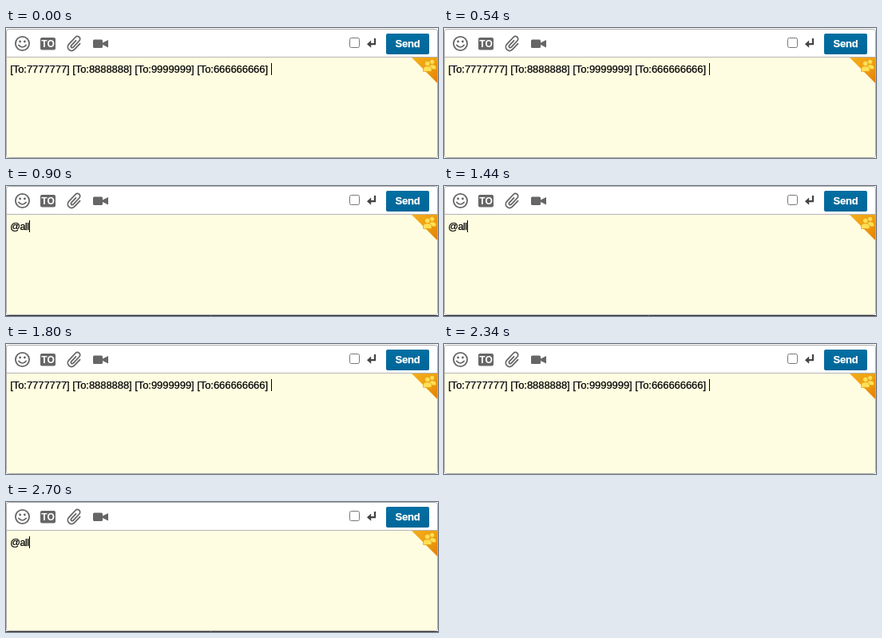
Recreate the animation shown at these times as an HTML page. Size 541 px wide and 163 px high, loop 3600 ms.

```html
<!DOCTYPE html>
<html lang="en">
<head>
<meta charset="utf-8">
<title>Message box</title>
<style>
  html, body { margin: 0; width: 100%; height: 100%; overflow: hidden; background: #fff; }
  svg { display: block; width: 541px; height: 163px; }
  text { font-family: "Liberation Sans", Arial, Helvetica, sans-serif; white-space: pre; }
  .line { fill: none; stroke: #666; stroke-linecap: round; stroke-linejoin: round; }
</style>
</head>
<body>
<svg viewBox="0 0 541 163" xmlns="http://www.w3.org/2000/svg">
  <defs>
    <linearGradient id="blue" x1="0" y1="0" x2="0" y2="1">
      <stop offset="0" stop-color="#036fa2"/>
      <stop offset="1" stop-color="#006699"/>
    </linearGradient>
    <linearGradient id="amber" x1="0" y1="0" x2="1" y2="1">
      <stop offset="0" stop-color="#f2ad1c"/>
      <stop offset=".5" stop-color="#f0a010"/>
      <stop offset="1" stop-color="#e27f0a"/>
    </linearGradient>
  </defs>
  <rect width="541" height="163" fill="#fff"/>

  <g id="panel">
    <rect x=".5" y="1.5" width="540" height="161" rx="3" fill="#fff" stroke="#adadad"/>
    <path d="M1 37H540V159.5Q540 162 537.5 162H3.5Q1 162 1 159.5Z" fill="#fffde1"/>
    <path d="M1 36.5H540" stroke="#b5b5b5"/>

    <!-- smiley -->
    <circle class="line" cx="20.5" cy="19.5" r="8.6" stroke-width="1.8"/>
    <circle cx="17.6" cy="17" r="1.4" fill="#666"/>
    <circle cx="23.4" cy="17" r="1.4" fill="#666"/>
    <path class="line" d="M15.8 21.4Q20.5 26.6 25.2 21.4" stroke-width="1.6"/>

    <!-- recipient badge -->
    <rect x="43" y="12" width="19" height="15.5" rx="2" fill="#666"/>
    <text x="52.5" y="24" font-size="12" font-weight="bold" fill="#fff" text-anchor="middle">TO</text>

    <!-- paperclip -->
    <path class="line" transform="translate(86 19.6) rotate(43)" stroke-width="1.8"
      d="M4.8 -4.5V5.6A4.8 4.8 0 0 1 -4.8 5.6V-6.6A3.3 3.3 0 0 1 1.8 -6.6V4.6A1.6 1.6 0 0 1 -1.5 4.6V-3.8"/>

    <!-- camera -->
    <rect x="109" y="14.5" width="12" height="10.5" rx="1.5" fill="#666"/>
    <path d="M121 18.5L128 15V24.5L121 21Z" fill="#666"/>

    <!-- enter option -->
    <rect x="430.5" y="12.5" width="12" height="12" rx="2" fill="#fff" stroke="#777"/>
    <path d="M462 13V20.2H455" fill="none" stroke="#444" stroke-width="2.3"/>
    <path d="M452 20.2L457.2 15.6V24.8Z" fill="#444"/>

    <rect x="476" y="7" width="54" height="26" rx="2" fill="url(#blue)"/>
    <text x="503" y="24.4" font-size="13" font-weight="bold" fill="#fff" stroke="#fff" stroke-width=".25"
      text-anchor="middle" letter-spacing="-.15">Send</text>

    <!-- corner flag -->
    <path d="M508 37H540V69Z" fill="url(#amber)"/>
    <g fill="#ffdf55" stroke="#e59a10" stroke-width=".7">
      <circle cx="533.6" cy="42.4" r="3"/>
      <path d="M529.6 51.8V48.8Q530 45.8 533.8 45.8T538.6 48.8V51.8Z"/>
      <circle cx="527.8" cy="44.6" r="3.3"/>
      <path d="M522.6 54.6V51Q523 47.8 527.8 47.8T533 51V54.6Z"/>
    </g>

    <text id="message" x="5.2" y="56" stroke="#000" stroke-width=".25"></text>
    <path id="caret" stroke="#000"/>
  </g>
  <path id="edge" d="M0 162.5H541" stroke="#333"/>
</svg>
<script>
const get = id => document.getElementById(id);
const panel = get("panel"), message = get("message"), caret = get("caret"), edge = get("edge");
const hold = 900;
const ids = ["7777777", "8888888", "9999999", "666666666"];
const states = [
  { text: ids.map(id => `[To:${id}]`).join(" "), size: 13, spacing: -.06, caret: 332.5, lift: 0 },
  { text: "@all", size: 12.5, spacing: -.45, caret: 29.5, lift: 1 }
];
let shown;

function draw(time) {
  const state = states[Math.floor(time / hold) % states.length];
  if (state === shown) return;
  shown = state;
  message.textContent = state.text;
  message.setAttribute("font-size", state.size);
  message.setAttribute("letter-spacing", state.spacing);
  caret.setAttribute("d", `M${state.caret} 44V59`);
  panel.setAttribute("transform", `translate(0 ${-state.lift})`);
  edge.setAttribute("visibility", state.lift ? "visible" : "hidden");
}

const start = performance.now();
function tick(now) {
  draw(Math.max(0, now - start));
  requestAnimationFrame(tick);
}
draw(0);
requestAnimationFrame(tick);
</script>
</body>
</html>
```
